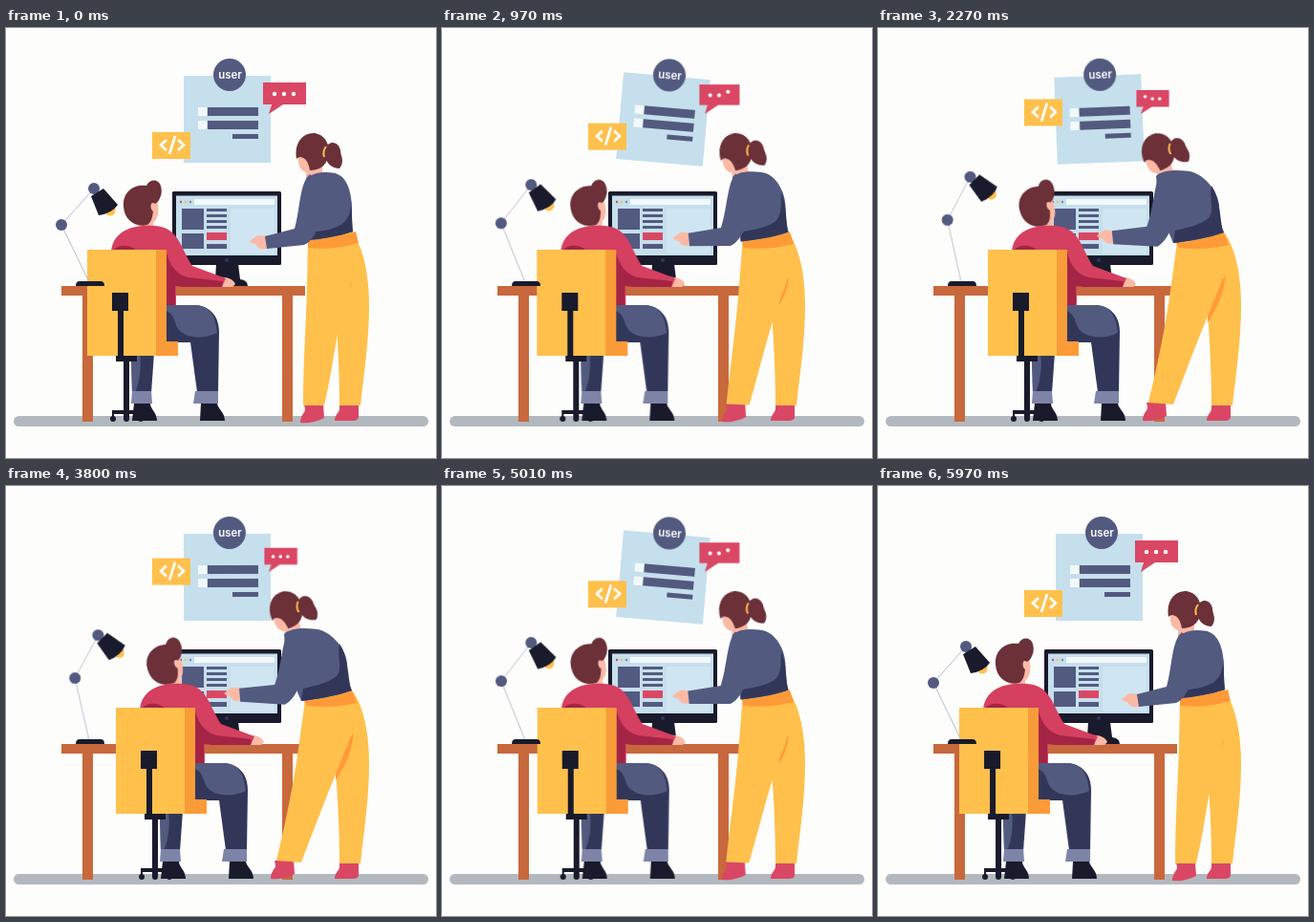
An HTML page without scripts for the animation above (6000 ms loop, 450 by 450 pixels).

```html
<!DOCTYPE html>
<html lang="en">
<head>
<meta charset="utf-8">
<title>Coding together</title>
<style>
html, body { margin: 0; width: 100%; height: 100%; overflow: hidden; background: #fdfdfc; }
svg { display: block; width: 100vw; height: 100vh; }
:root { --sine: cubic-bezier(.37, 0, .63, 1); --rise: cubic-bezier(.61, 1, .88, 1); --fall: cubic-bezier(.12, 0, .39, 0); }

.black { fill: #191a2b; }
.slate { fill: #535a80; }
.navy { fill: #32375a; }
.blue { fill: #c6dfec; }
.pale { fill: #f3f8fb; }
.yellow { fill: #ffc04c; }
.amber { fill: #f79c39; }
.orange { fill: #ff9a38; }
.wood { fill: #c8683d; }
.red { fill: #da4764; }
.shirt { fill: #d53f60; }
.wine { fill: #a42446; }
.skin { fill: #fbb9a6; }
.hair { fill: #6b3038; }
.cuff { fill: #7d84a8; }

/* step over, stay, step back */
.slide, .lean, .step, .morph { animation: 6s var(--sine) infinite; }
.slide { animation-name: slide; }
.lean { animation-name: lean; transform-origin: 321px 132px; }
.step { animation-name: step; }
@keyframes slide { 33.33%, 66.67% { transform: translateX(30px); } }
@keyframes lean { 33.33%, 66.67% { transform: translate(-27px, 0) rotate(-14deg); } }
@keyframes step { 33.33%, 66.67% { transform: translate(-31px, -2px); } }

.torso { animation-name: torso; }
.back { animation-name: back; }
.leg { animation-name: leg; }
.fold { animation-name: fold; }
.belt { animation-name: belt; }
@keyframes torso { 33.33%, 66.67% { d: path("M291 155C297 148 318 148 330 151C345 157 357 173 357 188C357 198 358 207 362 214C345 220 326 223 309 225L294 190Z"); } }
@keyframes back { 33.33%, 66.67% { d: path("M349 165C346 180 353 190 346 199C336 207 322 209 311 212L309 225C326 223 345 220 362 214C357 203 360 182 349 165Z"); } }
@keyframes leg { 33.33%, 66.67% { d: path("M313 224L361 213C366 232 364 252 358 270C341 310 322 360 309 394L283 392C292 355 301 312 306 275Z"); } }
@keyframes fold { 33.33%, 66.67% { d: path("M364 258C361 282 354 294 345 308L344 290Z"); } }
@keyframes belt { 33.33%, 66.67% { d: path("M312 225C330 223 347 219 362 214L367 227C350 231 335 232 315 230Z"); } }

/* pointing and tapping */
.arm { animation-name: arm; }
.hand { animation: hand 6s var(--sine) infinite; }
@keyframes arm {
  33.33%, 66.67% { d: path("M295 152C289 164 288 190 281 208L243 211L244 225L291 229C303 224 312 200 322 170Z"); }
  50% { d: path("M295 152C290 164 289 190 283 207L254 219L257 232L299 227C307 220 314 198 322 170Z"); }
}
@keyframes hand {
  33.33%, 66.67% { transform: translate(-28px, -7px); }
  50% { transform: translate(-16px, 1px); }
}

.nod { animation: nod 6s var(--sine) infinite; transform-origin: 146px 212px; }
@keyframes nod {
  33.33%, 66.67% { transform: rotate(-13deg); }
  50% { transform: rotate(-3deg); }
}

/* three second swings */
.low, .high, .bubble, .code { animation: 3s var(--sine) infinite alternate; }
.low { animation-name: low; transform-origin: 87px 266px; }
.high { animation-name: high; transform-origin: 58px 206px; }
.bubble { animation-name: shrink; transform-origin: 275px 90px; }
.code { animation-name: lift; }
@keyframes low { to { transform: rotate(15.5deg); } }
@keyframes high { to { transform: rotate(-31.7deg); } }
@keyframes shrink { to { transform: scale(.72); } }
@keyframes lift { to { transform: translateY(-40px); } }

.page { animation: sway 6s infinite; transform-origin: 231px 95px; }
@keyframes sway {
  0%, 66.667% { transform: rotate(0deg); animation-timing-function: var(--rise); }
  16.667%, 83.333% { transform: rotate(5deg); animation-timing-function: var(--fall); }
  33.333% { transform: rotate(0deg); animation-timing-function: var(--rise); }
  50% { transform: rotate(-5deg); animation-timing-function: var(--fall); }
  100% { transform: rotate(0deg); }
}

.dot { animation: 2s var(--sine) infinite; }
.d1 { animation-name: d1; }
.d2 { animation-name: d2; }
.d3 { animation-name: d3; }
@keyframes d1 { 4%, 32% { transform: none; } 18% { transform: translateY(-4px); } }
@keyframes d2 { 19%, 47% { transform: none; } 33% { transform: translateY(-4px); } }
@keyframes d3 { 32%, 62% { transform: none; } 47% { transform: translateY(-4px); } }
</style>
</head>
<body>
<svg viewBox="0 0 450 450">
  <rect x="8" y="406" width="434" height="11" rx="5.5" fill="#b2b9be"/>

  <g class="page">
    <path class="blue" d="M186 50h91v91h-91z"/>
    <path class="pale" d="M201 83h9v9h-9zM201 97h9v9h-9z"/>
    <path class="slate" d="M211 83h53v9h-53zM211 97h53v9h-53zM237 111h27v5h-27z"/>
    <circle class="slate" cx="234" cy="49" r="17"/>
    <text x="234.5" y="53" text-anchor="middle" fill="#fff" font-family="Inter, 'Open Sans', sans-serif" font-weight="600" font-size="11.5">user</text>
  </g>

  <g class="bubble">
    <path class="red" d="M269 57h45v23h-24L275 90L278 80h-9z"/>
    <g fill="#fff">
      <circle class="dot d1" cx="281" cy="69" r="2.2"/>
      <circle class="dot d2" cx="291" cy="69" r="2.2"/>
      <circle class="dot d3" cx="301" cy="69" r="2.2"/>
    </g>
  </g>

  <g class="code">
    <path class="yellow" d="M153 109h40v28h-40z"/>
    <path d="M168 117l-6 5.500l6 5.500M180 117l6 5.500l-6 5.500M177 113l-6 19" fill="none" stroke="#fff" stroke-width="2.700"/>
  </g>

  <!-- monitor -->
  <path class="black" d="M220 247h23l2 16q8 1 8 7h-40q0-6 6-7z"/>
  <rect class="black" x="174" y="171" width="114" height="77" rx="1.500"/>
  <path class="blue" d="M178 175.500h106v62.500h-106z"/>
  <path class="pale" d="M197 179h84v6h-84z"/>
  <circle class="red" cx="183" cy="182" r="1.200"/>
  <circle class="yellow" cx="188" cy="182" r="1.200"/>
  <circle class="cuff" cx="193" cy="182" r="1.200"/>
  <path fill="#cfe6f2" d="M235 189h46v47h-46z"/>
  <path class="slate" d="M184 189h23v22h-23zM184 215h23v16h-23zM210 189h21v3h-21zM210 195h21v3h-21zM210 201h21v3h-21zM210 207h21v3h-21zM210 226h21v5h-21z"/>
  <path class="red" d="M210 214h21v8h-21z"/>
  <circle class="navy" cx="231" cy="243" r="2"/>

  <!-- desk -->
  <path class="wood" d="M58 270h255v10h-13v132h-11V280H91v132h-11V280H58z"/>

  <!-- seated man and chair -->
  <g class="slide">
    <path class="navy" d="M131 340h24L152 382h-20z"/>
    <path class="slate" d="M131 340h9q3 22-5 42h-3z"/>
    <path class="cuff" d="M132 380h20l1 13h-22z"/>
    <path class="black" d="M134 393h17c0 6 7 9 7 18h-26z"/>

    <path class="navy" d="M160 290h38C214 291 223 302 223 318L222 381h-22L193 329h-33z"/>
    <path class="slate" d="M166 290h32C212 291 219 299 221 319C205 327 181 325 177 308C175 300 170 296 166 296z"/>
    <path class="cuff" d="M198 380h24v13h-26z"/>
    <path class="black" d="M204 393h17c1 6 8 9 8 18h-26z"/>

    <g class="nod">
      <path class="skin" d="M138 190L157 178C161 188 160 199 154 204L155 213H138z"/>
      <path class="hair" d="M123 187C122 172 133 163 147 165C149 160 155 158 159 161C163 163 164 173 161 178C160 181 158 183 156 184C151 180 150 189 154 192C153 199 152 203 148 206C135 209 124 201 123 187Z"/>
    </g>

    <path class="skin" d="M224 261C231 260 238 263 240 268L237 271H222z"/>
    <path class="shirt" d="M110 233C112 219 121 211 136 208C148 206 160 206 168 210C182 217 185 234 195 249L230 262L226 271H186L178 268V290H112z"/>
    <path class="wine" d="M112 233C117 226 130 226 137 233zM168 236C172 248 177 257 190 261L227 265L226 271H186L177 270V290H168z"/>

    <path class="orange" d="M150 328h30v15h-30z"/>
    <path class="amber" d="M150 232h18v111h-18z"/>
    <path class="yellow" d="M85 232h72v111H85z"/>
    <path class="black" d="M111 277h17v19h-5v47h14v6h-8v51h13v9h-2v-5h-11v5h-6v-5h-10v5h-2v-9h12v-51h-8v-6h2v-47h-6z"/>
    <g class="black">
      <circle cx="112" cy="409" r="3"/>
      <circle cx="126" cy="409" r="3"/>
      <circle cx="141" cy="409" r="3"/>
    </g>
  </g>

  <!-- lamp -->
  <g class="low">
    <path d="M87 266L58 206" stroke="#b9bccb"/>
    <g class="high">
      <path d="M58 206L92 168" stroke="#b9bccb"/>
      <circle class="slate" cx="58" cy="206" r="6"/>
      <circle class="yellow" cx="109" cy="191" r="5.500"/>
      <circle class="slate" cx="92" cy="168" r="6"/>
      <path class="black" d="M102 168L117 185Q111 194 97 196L89 176Z"/>
    </g>
  </g>
  <path class="black" d="M73 270q0-5 4-5h22q4 0 4 5z"/>

  <!-- standing woman -->
  <path class="red" d="M349 393h20v14q0 4-6 4h-19c0-7 5-8 5-13z"/>
  <path class="red step" d="M312 394h20l1 14C326 412 316 414 308 413C308 405 313 403 313 399z"/>
  <path class="yellow" d="M335 222L362 214C373 228 380 255 380 290C380 330 374 365 371 395H349C349 360 347 325 345 298z"/>
  <path class="orange morph fold" d="M362 262C362 268 361 271 360 273L359 270Z"/>
  <path class="yellow morph leg" d="M316 222L363 212C366 232 365 255 360 272C347 300 344 350 333 395L311 395C311 350 314 310 315 270Z"/>
  <path class="orange morph belt" d="M316 222C335 221 352 217 366 213L369 225C350 230 335 232 316 230Z"/>

  <g class="lean">
    <path class="skin" d="M306 132C305 142 307 149 314 151V158H331V140z"/>
    <path class="hair" d="M334 127C337 117 348 118 350 128C350 134 355 139 349 147C341 147 335 141 334 134Z"/>
    <path class="hair" d="M304 137C301 120 311 109 323 110C335 112 340 124 337 135C335 144 328 149 318 149C317 142 314 137 311 136C308 134 306 135 304 137Z"/>
    <path d="M335 124q-4 5-2 11" fill="none" stroke="#ffc04c" stroke-width="2"/>
  </g>

  <path class="slate morph torso" d="M316 157C322 150 340 150 347 153C357 157 362 172 362 190C362 198 362 206 363 213C348 218 330 221 316 222L314 185Z"/>
  <path class="navy morph back" d="M361 180C361 190 360 198 352 205C342 211 330 213 316 214L316 222C330 221 348 218 363 213C362 206 362 190 361 180Z"/>
  <path class="skin hand" d="M275 218L263 217L255 223C257 226 260 226 261 226C263 231 268 232 275 231Z"/>
  <path class="slate morph arm" d="M318 153C307 162 308 190 302 210L271 218L273 231L312 227C325 222 333 195 338 170Z"/>
</svg>
</body>
</html>
```
